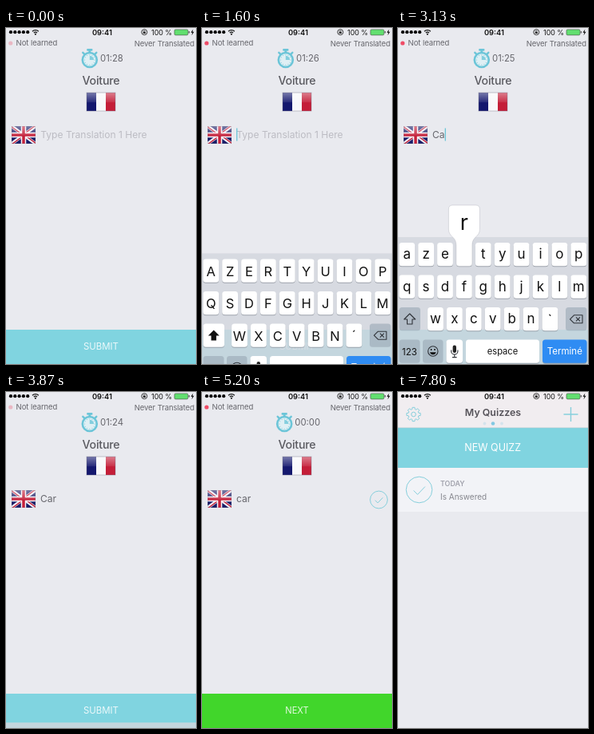
An HTML page for the animation above (7.87 s loop, 238x421 px).

```html
<!DOCTYPE html>
<html lang="en">
<head>
<meta charset="utf-8">
<title>Translation quiz</title>
<style>
html, body { margin: 0; width: 100%; height: 100%; overflow: hidden; background: #e9eaef; }
svg { display: block; }
#stage { width: 100vw; height: 100vh; font-family: Inter, Roboto, "Liberation Sans", sans-serif; }
text { fill: #66666c; white-space: pre; }
.mid { text-anchor: middle; }
.end { text-anchor: end; }
.white { fill: #fff; }
.soft { fill: #fff; fill-opacity: .85; }
.ink { fill: #111; }
.line { fill: none; stroke: #86cfdc; stroke-width: 1; }
.dark { fill: none; stroke: #30343a; stroke-width: 1.1; stroke-linejoin: round; }
</style>
</head>
<body>
<svg id="stage" viewBox="0 0 238 421" preserveAspectRatio="none">
  <defs>
    <linearGradient id="gloss" x2="0" y2="1">
      <stop offset="0" stop-color="#fff" stop-opacity=".42"/>
      <stop offset=".5" stop-color="#fff" stop-opacity=".1"/>
      <stop offset=".55" stop-color="#fff" stop-opacity="0"/>
    </linearGradient>
  </defs>
  <g id="home"></g>
  <g id="card"></g>
  <g id="keyboard"></g>
  <g id="status"></g>
</svg>
<script>
const LOOP = 7870;
const TEAL = '#80d4e0';
const WATCH = '#6cc5d8';
const $ = id => document.getElementById(id);
const clamp = v => Math.min(1, Math.max(0, v));
const span = (t, start, length) => clamp((t - start) / length);
const easeOut = p => 1 - (1 - p) ** 4;
const easeInOut = p => p < .5 ? 4 * p ** 3 : 1 - 4 * (1 - p) ** 3;

const label = (x, y, size, str, cls = '', more = '') =>
  `<text x="${x}" y="${y}" font-size="${size}" class="${cls}" ${more}>${str}</text>`;
const box = (x, y, w, h, fill, more = '') =>
  `<rect x="${x}" y="${y}" width="${w}" height="${h}" fill="${fill}" ${more}/>`;
const path = (d, cls = '', more = '') => `<path d="${d}" class="${cls}" ${more}/>`;
const disc = (x, y, r, more = '') => `<circle cx="${x}" cy="${y}" r="${r}" ${more}/>`;

function gear(cx, cy) {
  let d = '';
  for (let i = 0; i < 8; i++) {
    [[-.28, 6.6], [-.17, 8.8], [.17, 8.8], [.28, 6.6]].forEach(([da, r]) => {
      const a = i * Math.PI / 4 + da;
      d += `${d ? 'L' : 'M'}${(cx + r * Math.cos(a)).toFixed(2)} ${(cy + r * Math.sin(a)).toFixed(2)}`;
    });
  }
  return path(d + 'Z', 'line') + disc(cx, cy, 2.8, 'class="line"');
}

function tick(cx, cy, r) {
  const s = r / 16.5;
  return disc(cx, cy, r, 'class="line"') +
    path(`M${cx - 7 * s} ${cy + s}l${5 * s} ${5 * s}l${9.5 * s} ${-10 * s}`, 'line');
}

function frenchFlag(x, y) {
  return box(x, y, 12, 23, '#14186e') + box(x + 12, y, 12, 23, '#f8f8fa') +
    box(x + 24, y, 12, 23, '#c41e38') + box(x, y, 36, 23, 'url(#gloss)') +
    box(x, y, 36, 23, 'none', 'stroke="#777788" stroke-opacity=".5" stroke-width=".8"');
}

function britishFlag(x, y) {
  const cross = (d, color, w) => path(d, '', `stroke="${color}" stroke-width="${w}" fill="none"`);
  return `<svg x="${x}" y="${y}" width="30" height="22" viewBox="0 0 60 44">` +
    box(0, 0, 60, 44, '#191d68') +
    cross('M0 0L60 44M60 0L0 44', '#f0f0f5', 8) +
    cross('M-1 1L29 23M31 21L61 43M59 -1L29 21M31 23L1 45', '#c4203a', 3) +
    cross('M30 0V44M0 22H60', '#f7f7fa', 13) +
    cross('M30 0V44M0 22H60', '#c4203a', 7) +
    box(0, 0, 60, 44, 'url(#gloss)') +
    box(0, 0, 60, 44, 'none', 'stroke="#777788" stroke-opacity=".6" stroke-width="1.4"') + '</svg>';
}

function stopwatch() {
  let ticks = '';
  for (let i = 0; i < 12; i++) {
    const a = i * Math.PI / 6;
    ticks += disc(104.8 + 6.3 * Math.cos(a), 40 + 6.3 * Math.sin(a), .5, `fill="${WATCH}"`);
  }
  return box(101.2, 26, 7.2, 2.8, WATCH, 'rx=".8"') + box(103.4, 28, 2.8, 3, WATCH) +
    path('M96.3 30.8l2.4 2.4M113.3 30.8l-2.4 2.4', '', `stroke="${WATCH}" stroke-width="2.4" stroke-linecap="round"`) +
    disc(104.8, 40, 9, `fill="#dfeff4" stroke="${WATCH}" stroke-width="2.6"`) + ticks +
    path('M104.8 40V34.8A5.2 5.2 0 0 1 110 40Z', '', `fill="${WATCH}" fill-opacity=".8"`);
}

// Home screen
$('home').innerHTML =
  box(0, 0, 238, 421, '#e9eaef') + box(0, 0, 238, 45, '#f1edf0') +
  gear(19.5, 28) + path('M207.5 28h18M216.5 19v18', 'line', 'style="stroke-width:1.4"') +
  label(119, 30.3, 12.4, 'My Quizzes', 'mid', 'font-weight="600" style="fill:#555259"') +
  disc(108.5, 39.5, 1.9, 'fill="#d5e3ec"') + disc(119, 39.5, 2.3, 'fill="#83c8e2"') +
  disc(130, 39.5, 1.9, 'fill="#d5e3ec"') +
  box(0, 45, 238, 50, TEAL) + box(0, 44.6, 238, .6, '#a9c3cb') +
  label(118.7, 74, 12.5, 'NEW QUIZZ', 'mid white') +
  box(0, 95, 238, 55, '#f2f3f7') + tick(26.5, 122.5, 16.3) +
  label(53, 118.4, 8.9, 'TODAY', '', 'font-weight="600" style="fill:#a2a3ad"') +
  label(53, 134.6, 10, 'Is Answered', '', 'style="fill:#85868d"');

// Quiz card
const action = (fill, size, str) => box(0, 378, 238, 43, fill) + label(119, 403.4, size, str, 'mid soft');

$('card').innerHTML =
  box(0, -3, 238, 424, '#e9eaef') +
  disc(5.8, 19, 2.6, 'id="dot" fill="#ee4560"') +
  label(12.6, 22, 9.5, 'Not learned', '', 'letter-spacing="-.08"') +
  label(236, 22.8, 9.5, 'Never Translated', 'end', 'letter-spacing="-.08"') +
  `<g id="watch">${stopwatch()}</g>` +
  label(118, 42, 11.3, '', '', 'id="clock"') +
  label(118.9, 71, 14.2, 'Voiture', 'mid', 'font-weight="500" letter-spacing="-.2" style="fill:#5a5a60"') +
  frenchFlag(101, 81) + britishFlag(7, 123) +
  label(43.3, 138.2, 12.05, 'Type Translation 1 Here', '', 'id="hint" style="fill:#bcbcc3"') +
  label(43, 138.2, 12, '', '', 'id="answer"') +
  box(43, 125.5, 1.1, 16, '#55bfd3', 'id="caret"') +
  action(TEAL, 11.4, 'SUBMIT') +
  `<g id="graded">${action('#41d62b', 11.1, 'NEXT')}${tick(221.5, 135, 10.9)}</g>`;

// Keyboard
const ROWS = ['azertyuiop', 'qsdfghjklm', 'wxcvbn'];
const TOPS = [269, 309.5, 350, 390.5];
const keyX = (row, i) => (row === 2 ? 47 : 11.2) + i * 23.9;

function key(x, row, w, fill = '#fff', more = '') {
  return box(x, TOPS[row] + 1, w, 29.3, '#80868f', 'rx="3.5" opacity=".65"') +
    box(x, TOPS[row], w, 29.3, fill, 'rx="3.5" ' + more);
}
const softKey = (x, row, w) => box(x, TOPS[row], w, 29.3, '#9caab7', 'rx="3.5" opacity=".65"');
const arrow = 'M14.7 358l7 7h-3.8v6h-6.4v-6h-3.8z';

function letters(upper) {
  const glyphs = ROWS.map((row, r) => [...row].map((c, i) =>
    label(keyX(r, i), TOPS[r] + (upper ? 21.3 : 20.4), upper ? 16.5 : 17, upper ? c.toUpperCase() : c, 'mid ink')
  ).join('')).join('');
  const shift = upper ? key(1.5, 2, 26.5) + path(arrow, 'ink') : softKey(1.5, 2, 26.5) + path(arrow, 'dark');
  return glyphs + shift + label(190.4, 371, 16, upper ? '´' : '`', 'mid ink');
}

$('keyboard').innerHTML =
  box(0, 262, 238, 160, '#d3d7de', 'opacity=".82"') +
  ROWS.map((row, r) => [...row + (r === 2 ? '`' : '')].map((c, i) => key(keyX(r, i) - 9.9, r, 19.8)).join('')).join('') +
  `<g id="upper">${letters(true)}</g><g id="lower">${letters(false)}</g>` +
  softKey(210, 2, 26.5) +
  path('M215.5 364.8l5-5h10.5v10h-10.5zM223 362.3l5 5M228 362.3l-5 5', 'dark') +
  softKey(1.5, 3, 26) + label(14.4, 409.5, 11.5, '123', 'mid ink') +
  softKey(31, 3, 25.5) + disc(43.8, 405, 6.2, 'class="dark"') +
  path('M40 406.2a3.9 3.9 0 0 0 7.6 0z', 'ink') + disc(41.6, 403, .9) + disc(46, 403, .9) +
  key(60.5, 3, 20.5) + box(68.6, 397.5, 4.4, 9.5, '#222', 'rx="2.2"') +
  path('M66.7 403.5v1.5a4.1 4.1 0 0 0 8.2 0v-1.5M70.8 409.2v3.2M68 412.6h5.6', 'dark') +
  key(85, 3, 92) + label(131, 409, 11.2, 'espace', 'mid ink') +
  key(181, 3, 55.5, '#2f8cf3') + label(208.8, 409, 11.5, 'Terminé', 'mid white') +
  '<g id="popup"></g>';

function bubble(c, row, i) {
  const x = keyX(row, i), y = TOPS[row], b = Math.max(x, 20.5), l = b - 19.5, r = b + 19.5;
  return path(`M${l + 5} ${y - 47}H${r - 5}Q${r} ${y - 47} ${r} ${y - 42}V${y - 17}` +
    `C${r} ${y - 7} ${x + 10} ${y - 8} ${x + 10} ${y + 3}V${y + 26}q0 3.5 -3.5 3.5H${x - 6.5}` +
    `q-3.5 0 -3.5 -3.5V${y + 3}C${x - 10} ${y - 8} ${l} ${y - 7} ${l} ${y - 17}` +
    `V${y - 42}Q${l} ${y - 47} ${l + 5} ${y - 47}Z`, 'white', 'stroke="#9a9ea6" stroke-opacity=".45" stroke-width=".7"') +
    label(b, y - 16, 27, c, 'mid ink');
}

// Status bar
$('status').innerHTML =
  [0, 1, 2, 3, 4].map(i => disc(6 + i * 5.3, 5.2, 2.1)).join('') +
  path('M33 4.2a5.6 5.6 0 0 1 7.8 0M34.8 6.1a3 3 0 0 1 4.2 0', '', 'fill="none" stroke="#111" stroke-width="1.3"') +
  disc(36.9, 7.8, 1) +
  label(120.4, 8.5, 9.3, '09:41', 'mid ink', 'font-weight="600"') +
  disc(173.3, 5.2, 3.5, 'fill="none" stroke="#222" stroke-width=".9"') + box(171.8, 4.7, 3, 2.3, '#222') +
  path('M172.4 4.8v-.7a.9 .9 0 0 1 1.8 0v.7', '', 'fill="none" stroke="#222" stroke-width=".6"') +
  label(208.1, 8.5, 8.9, '100 %', 'end ink') +
  box(211, 1.9, 17, 7, '#62df70', 'rx="1.4" stroke="#444" stroke-width=".6"') +
  box(228.7, 4, 1.2, 2.6, '#444', 'rx=".5"') +
  path('M234.4 1.6l-3 4.2h2l-.9 3.4l3.1-4.4h-2z', 'ink');

// Timeline
const PRESSES = [
  { c: 'C', row: 2, i: 2, at: 2150 },
  { c: 'a', row: 0, i: 0, at: 2600 },
  { c: 'r', row: 0, i: 3, at: 3050 }
];
const HOLD = 140, FOCUS = 1440, DONE = 3659, GRADED = 4550, LEAVE = 6030;
const PULSE = [[0, .3], [900, 1], [1600, .95], [2150, .3], [3000, 1], [3900, .3], [5050, 1], [6130, .22], [7000, 1], [LOOP, .3]];

function pulse(t) {
  const n = PULSE.findIndex(([at]) => at > t);
  const [t0, v0] = PULSE[n - 1], [t1, v1] = PULSE[n];
  return v0 + (v1 - v0) * (1 - Math.cos(Math.PI * (t - t0) / (t1 - t0))) / 2;
}

const set = (id, name, value) => $(id).setAttribute(name, value);
const show = (id, on) => set(id, 'visibility', on ? 'visible' : 'hidden');
const write = (id, str) => { if ($(id).textContent !== str) $(id).textContent = str; };
const shift = (id, x, y) => set(id, 'transform', `translate(${x} ${y})`);
let pressed = null;

function draw(t) {
  const graded = t >= GRADED;
  const typed = PRESSES.filter(p => t >= p.at + HOLD).map(p => p.c).join('');

  shift('card', 0, 424 * easeInOut(span(t, LEAVE, 400)));
  set('dot', 'opacity', pulse(t));
  write('clock', graded ? '00:00' : '01:' + (28 - Math.floor((t + 500) / 1000)));
  set('clock', 'x', graded ? 116.3 : 118);
  shift('watch', graded ? -1.6 : 0, 0);
  set('graded', 'opacity', span(t, GRADED, 200));

  write('answer', graded ? 'car' : typed);
  show('hint', !typed);
  const width = typed ? $('answer').getComputedTextLength() : 0;
  set('caret', 'x', 43.2 + width);
  const sinceKey = t - (typed ? PRESSES[typed.length - 1].at + HOLD : FOCUS);
  show('caret', t >= FOCUS && t < DONE && sinceKey % 1000 < 550);

  const raised = easeOut(span(t, FOCUS, 400)) - easeOut(span(t, DONE, 400));
  shift('keyboard', 0, 160 * (1 - raised));
  show('keyboard', raised > 0);
  set('upper', 'display', typed ? 'none' : 'inline');
  set('lower', 'display', typed ? 'inline' : 'none');

  const now = PRESSES.find(p => t >= p.at && t < p.at + HOLD) || null;
  if (now !== pressed) {
    pressed = now;
    $('popup').innerHTML = now ? bubble(now.c, now.row, now.i) : '';
  }
}

const begin = performance.now();
function play() {
  draw((performance.now() - begin) % LOOP);
  requestAnimationFrame(play);
}
play();
</script>
</body>
</html>
```
